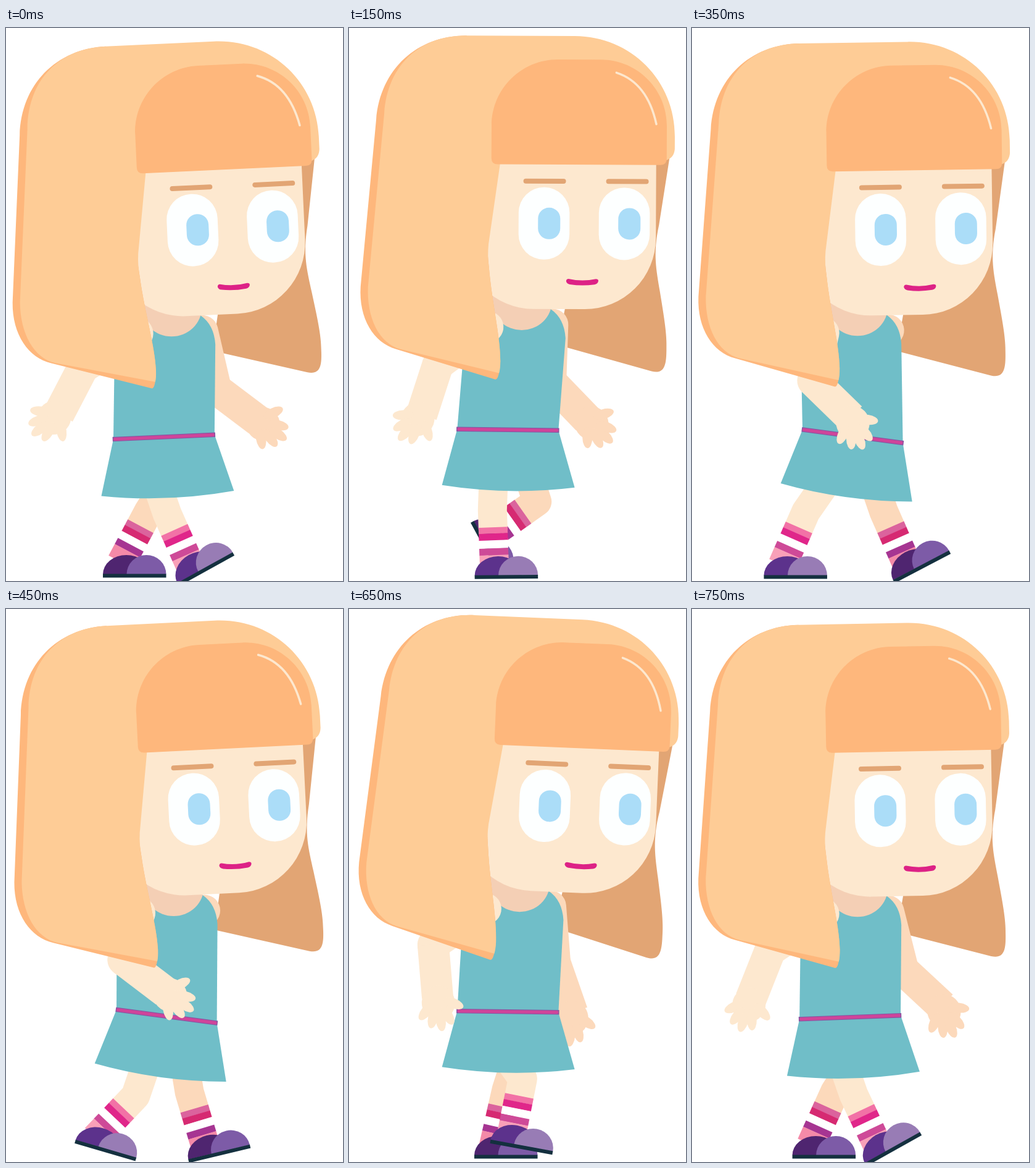
Animation of 546x895 px, one loop 800 ms. Source, as an HTML page with a canvas:

```html
<!DOCTYPE html>
<html lang="en">
<head>
<meta charset="utf-8">
<title>Walking girl</title>
<style>
  html, body { margin: 0; width: 100%; height: 100%; overflow: hidden; background: #fff; }
  canvas { display: block; }
</style>
</head>
<body>
<canvas id="stage" width="546" height="895"></canvas>
<script>
const ctx = document.getElementById('stage').getContext('2d');
const STEP = 50, STEPS = 16, RAD = Math.PI / 180, GROUND = 870;

const HAIR = '#fecc96', HAIR_DARK = '#feb77c', HAIR_BACK = '#e2a574';
const DRESS = '#70bec8', NECK = '#f4cfb5';
const NEAR = {
  skin: '#fde8cf', sock: ['#f272a6', '#e0268a', '#ffffff', '#ce4a98', '#f9a0b8'],
  shoe: '#5c328c', toe: '#987cb5'
};
const FAR = {
  skin: '#fcd9bb', sock: ['#db639d', '#d62a72', '#ffffff', '#a63592', '#f48aa8'],
  shoe: '#4f2570', toe: '#7d5ba7'
};

// Limb poses over one stride, at the times in KEYS (the far side is half a stride later)
const KEYS = [0, 1, 3, 5, 7, 8, 9, 11, 13, 15];
const LIMB = {
  elbowX: [125, 128, 146, 186, 196, 194, 190, 179, 138, 127],
  elbowY: [549, 547, 545, 558, 571, 571, 568, 558, 543, 552],
  forearm: [-27.5, -28, -16.5, 17, 46.5, 53, 53, 42.5, 7, -21],
  ankleX: [298, 276, 232.5, 190, 147.5, 141, 147, 187, 260, 299.5],
  ankleY: [869, 870, 870, 868, 865, 863, 854, 820, 847, 867],
  shin: [24, 17, 1, -12, -24, -28, -43, -54, -14, 24.5],
  foot: [-29, -14, 0, 0, 0, 0, 15, 62, 13.5, -28.5]
};

// Periodic cubic interpolation
function sample(values, u) {
  const n = KEYS.length;
  const key = j => KEYS[(j + n) % n] + STEPS * Math.floor(j / n);
  const val = j => values[(j + n) % n];
  const slope = j => (val(j + 1) - val(j - 1)) / (key(j + 1) - key(j - 1));
  let i = n - 1;
  while (KEYS[i] > u) i--;
  const h = key(i + 1) - key(i), s = (u - key(i)) / h, r = 1 - s;
  return val(i) * (1 + 2 * s) * r * r + val(i + 1) * s * s * (3 - 2 * s)
    + h * s * r * (slope(i) * r - slope(i + 1) * s);
}

function limbPose(u) {
  u = (u + STEPS) % STEPS;
  const pose = { hand: u < 8 ? -24 : 3 };
  for (const name in LIMB) pose[name] = sample(LIMB[name], u);
  return pose;
}

const wave = (k, period, peak) => Math.cos(2 * Math.PI * (k - peak) / period);

function place(x, y, degrees, draw) {
  ctx.save();
  ctx.translate(x, y);
  ctx.rotate(degrees * RAD);
  draw();
  ctx.restore();
}

function fill(color, d) {
  ctx.fillStyle = color;
  ctx.fill(new Path2D(d));
}

function ellipse(color, x, y, rx, ry, turn = 0, from = 0, to = 2 * Math.PI) {
  ctx.fillStyle = color;
  ctx.beginPath();
  ctx.ellipse(x, y, rx, ry, turn, from, to);
  ctx.fill();
}

function box(color, x, y, w, h, r) {
  ctx.fillStyle = color;
  ctx.beginPath();
  ctx.roundRect(x, y, w, h, r);
  ctx.fill();
}

function line(color, width, points, cap = 'round') {
  ctx.strokeStyle = color;
  ctx.lineWidth = width;
  ctx.lineCap = cap;
  ctx.lineJoin = 'round';
  ctx.beginPath();
  points.forEach(p => ctx.lineTo(p[0], p[1]));
  ctx.stroke();
}

function drawArm({ skin }, pose, shoulder, dx, dy) {
  const x = pose.elbowX + dx, y = pose.elbowY + dy;
  line(skin, 51, [shoulder, [x, y]]);
  place(x, y, -pose.forearm, () => {
    ctx.fillStyle = skin;
    ctx.fillRect(-25.5, 0, 51, 86);
    place(0, 85, -pose.hand, () => {
      ellipse(skin, 0, 10, 27, 28);
      [[-46, 46], [-20, 51], [0, 55], [21, 50], [60, 44]].forEach(([angle, reach]) =>
        place(0, 0, -angle, () => ellipse(skin, 0, reach - 16, 8, 17)));
    });
  });
}

function drawShoe({ shoe, toe }) {
  ellipse(shoe, 6, 16, 38, 31, 0, Math.PI, 2 * Math.PI);
  ellipse(toe, 38.5, 16, 32, 31, 0, Math.PI, 2 * Math.PI);
  ctx.fillStyle = '#14303f';
  ctx.fillRect(-32, 15.5, 102.5, 6);
}

function drawLeg(side, pose, hip, dx, dy) {
  const x = pose.ankleX + dx, y = pose.ankleY + dy, a = pose.shin * RAD;
  const up = d => [x - d * Math.sin(a), y - d * Math.cos(a)];
  line(side.skin, 47, [hip, up(90), up(55)], 'butt');
  place(x, y, -pose.shin, () => {
    const tops = [-62, -52, -41, -28, -17, 4];
    side.sock.forEach((color, i) => {
      ctx.fillStyle = color;
      ctx.fillRect(-23.5, tops[i], 47, tops[i + 1] - tops[i] + 0.3);
    });
  });
  // A flat foot stays on the ground while the ankle rises
  const footY = Math.max(y, GROUND + dy - 2 * Math.abs(pose.foot));
  place(x, footY, pose.foot, () => drawShoe(side));
}

function drawDress(hip, chest) {
  const c = Math.cos(hip.a * RAD), s = Math.sin(hip.a * RAD);
  const waist = x => [hip.x + x * c, hip.y + x * s];
  const top = (x, y) => [chest.x + x, chest.y + y];
  place(hip.x, hip.y, hip.a, () =>
    fill(DRESS, 'M-82 0H82L109.5 92Q2 106.5 -105.5 91Z'));
  ctx.fillStyle = DRESS;
  ctx.beginPath();
  ctx.moveTo(...waist(-82));
  ctx.lineTo(...top(-92, 10));
  ctx.quadraticCurveTo(...top(-68, -20), ...top(-47, -34));
  ctx.lineTo(...top(47, -34));
  ctx.quadraticCurveTo(...top(69, -19), ...top(71, 13));
  ctx.lineTo(...waist(82));
  ctx.closePath();
  ctx.fill();
  place(hip.x, hip.y, hip.a, () => {
    line('#8a56a2', 7.5, [[-79.5, 0], [79.5, 0]], 'square');
    line('#d0449a', 5, [[-79.5, 0], [79.5, 0]]);
  });
  ellipse(NECK, chest.x, chest.y - 47, 49, 47);
}

function inHead(head, draw) {
  place(head.x, head.y, head.a, () => {
    ctx.translate(-382, -317);
    draw();
  });
}

function drawBackHair() {
  fill(HAIR_BACK, 'M400 200H521L503 318C493 365 499 390 505 426C512 468 517 495 516 520' +
    'C516 545 513 560 492 555L340 513Z');
}

function drawEye(x) {
  box('#fdffff', x, 258, 82.5, 117, 41);
  box('#abddf8', x + 31.5, 291, 36, 51, 17.5);
}

function drawHead() {
  box(NEAR.skin, 185, 160, 313, 295, [0, 0, 115, 115]);
  [283, 417].forEach(x => box(HAIR_BACK, x, 244, 69, 8, 4));
  [275.5, 405.5].forEach(drawEye);
  fill('#dd2286', 'M357 406Q379 411 401 406Q406 406 405 410Q404 414 399 415' +
    'Q379 418 359 415Q354 414 353 410Q353 406 357 406Z');

  fill(HAIR_DARK, 'M190 13C110 13 50 68 44 150L20 420C17 472 42 511 78 521' +
    'L238 569Q245 572 247 540C247 500 233 445 228 390Z');
  fill(HAIR, 'M190 13H365C457 13 528 85 528 175V195Q527 209 515 213H245' +
    'V221L227 350Q225 370 228 390C233 445 247 500 247 540' +
    'Q247 552 245 559L85 521C50 512 30 470 32 420L57 140C62 60 115 13 190 13Z');
  fill(HAIR_DARK, 'M231 158C231 99 279 51 338 51H408C467 51 515 99 515 158V211' +
    'Q515 221 505 221H241Q231 221 231 211Z');
  ctx.strokeStyle = NEAR.skin;
  ctx.lineWidth = 3.5;
  ctx.lineCap = 'round';
  ctx.stroke(new Path2D('M433 72Q483 88 498 155'));
}

function drawFrame(k) {
  // The first half of the stride runs slightly late, the second slightly early
  const u = k - 0.15 * Math.sin(2 * Math.PI * k / STEPS);
  const near = limbPose(u), far = limbPose(u + STEPS / 2);
  const head = {
    x: 376.3 + 8.8 * wave(u, 8, 4.1),
    y: 321.6 - 4.5 * wave(k, 8, 2.95),
    a: -0.2 + 2.8 * wave(u, 8, 4.65)
  };
  const chest = { x: 274 + 6.3 * wave(k, 8, 3.5), y: 493.6 - 5.8 * wave(k, 8, 3.8) };
  const hip = {
    x: 258.2 - 2.3 * wave(k, 16, 0),
    y: 655.5 - 6.5 * wave(k, 8, 3.8),
    a: 2.75 - 5.25 * wave(k, 16, 0)
  };

  ctx.fillStyle = '#fff';
  ctx.fillRect(0, 0, 546, 895);
  inHead(head, drawBackHair);
  drawArm(FAR, far, [chest.x + 50, chest.y - 9], 146, 13);
  drawLeg(FAR, far, [hip.x + 24, hip.y + 45], 48, -2);
  drawLeg(NEAR, near, [hip.x - 22, hip.y + 45], 0, 0);
  drawDress(hip, chest);
  drawArm(NEAR, near, [chest.x - 55, chest.y - 5], 0, 0);
  inHead(head, drawHead);
}

const start = performance.now();
function tick() {
  drawFrame(Math.floor((performance.now() - start) / STEP) % STEPS);
  requestAnimationFrame(tick);
}
tick();
</script>
</body>
</html>
```
